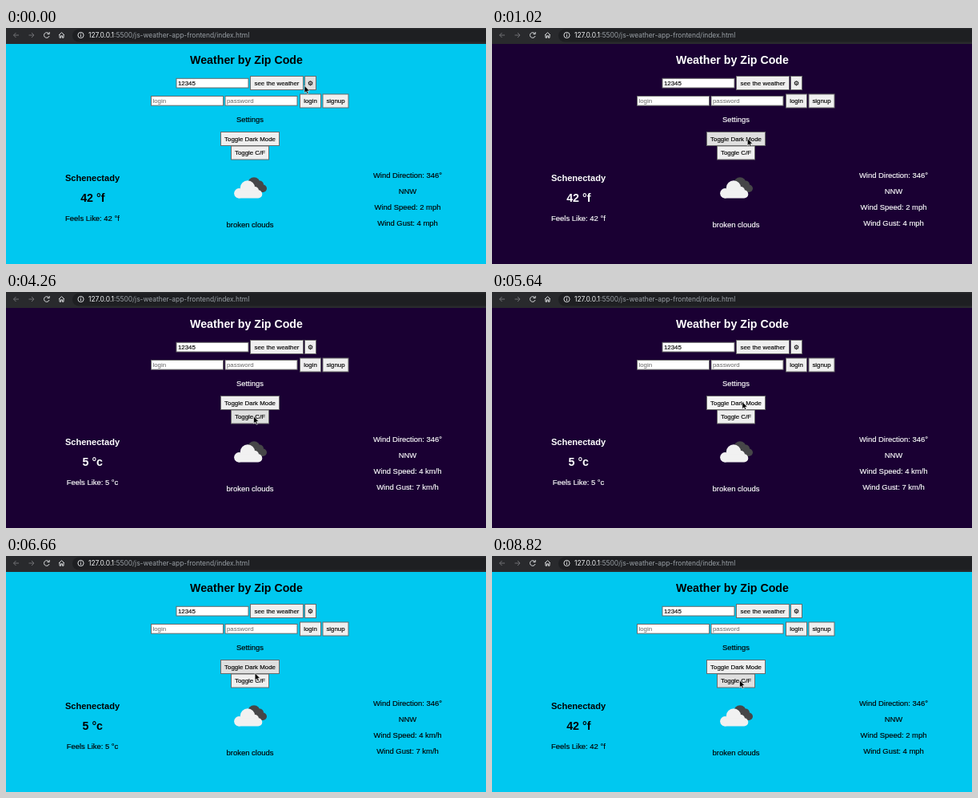
Animation, 600 px wide and 296 px high, one loop 8880 ms. Source, as an HTML page:

```html
<!DOCTYPE html>
<html lang="en">
<head>
<meta charset="utf-8">
<title>Weather by Zip Code</title>
<style>
  html, body { margin: 0; width: 100%; height: 100%; overflow: hidden; }
  svg { display: block; width: 600px; height: 296px; font: 9.45px "Liberation Sans", Arial, sans-serif; }
  #page { fill: #000; stroke: #000; stroke-width: .15; }
  #sky { fill: #00c8f0; }
  .dark #sky { fill: #1a0033; }
  .dark #page { fill: #fff; stroke: #fff; }
  .mid { text-anchor: middle; }
  .h2 { font-size: 14.2px; font-weight: bold; stroke: none; }
  .h3 { font-size: 11.05px; font-weight: bold; stroke: none; }
  .control { font-size: 7.87px; fill: #000; }
  .control text { stroke: #000; stroke-width: .15; }
  .control rect { fill: #efefef; stroke: #6b6b6b; }
  .control .field { fill: #fff; }
  .control .hover { fill: #dfdfdf; }
  .control .press { fill: #f5f5f5; }
  .control .hint { fill: #666; stroke: none; }
  .url { font: 8.43px Inter, sans-serif; fill: #9aa0a6; }
  .icons { fill: none; stroke: #dcdee0; }
  .icons .dim { stroke: #707175; }
</style>
</head>
<body>
<svg id="stage" viewBox="0 0 600 296">
  <rect id="sky" width="600" height="296"/>
  <rect width="600" height="20" fill="#292a2d"/>
  <rect x="83" y="1.5" width="540" height="16" rx="8" fill="#1e1f22"/>
  <g class="icons">
    <path class="dim" d="M16 9H9.5M12.5 6 9.5 9 12.5 12M28.5 9H35M32 6 35 9 32 12"/>
    <path d="M53.3 6.8a3.3 3.3 0 1 0 .7 3.2M54.2 5V7.6H51.6"/>
    <path d="M66 9 69.5 5.7 73 9M67 8.5v3.7h1.6v-2.4h1.8v2.4H72V8.5"/>
    <circle cx="93.5" cy="9" r="3.6"/>
    <path d="M93.5 8.5v2.6M93.5 6.6v1"/>
  </g>
  <text class="url" x="103" y="12"><tspan fill="#f1f3f4">127.0.0.1</tspan>:5500/js-weather-app-frontend/index.html</text>

  <g id="page" class="mid">
    <text class="h2" x="300.5" y="45">Weather by Zip Code</text>
    <text x="305" y="118">Settings</text>
    <text class="h3" x="108" y="192">Schenectady</text>
    <text class="h2" x="108.3" y="218.3" id="temp"></text>
    <text x="108" y="242" id="feels"></text>
    <text x="305" y="249.7">broken clouds</text>
    <text x="502" y="188">Wind Direction: 346°</text>
    <text x="502" y="208.3">NNW</text>
    <text x="502" y="228.3" id="speed"></text>
    <text x="502" y="248.3" id="gust"></text>
  </g>
  <g class="control" id="controls"></g>

  <g fill="#464648">
    <circle cx="310" cy="195" r="7.7"/>
    <circle cx="317" cy="196.5" r="5"/>
    <rect x="304" y="196.5" width="22" height="9.5" rx="4.7"/>
  </g>
  <g fill="#f1f1f1">
    <circle cx="302" cy="200.5" r="9.2"/>
    <circle cx="291.3" cy="207.3" r="6.2"/>
    <circle cx="311" cy="204" r="5"/>
    <rect x="286" y="203.3" width="34.3" height="10.2" rx="5.1"/>
  </g>
  <path id="cursor" d="M0 0V9.2L2.1 7.3 3.6 10.5 5.1 9.8 3.7 6.7H6.5Z" fill="#000" stroke="#fff" stroke-width=".6"/>
</svg>
<script>
const LOOP = 8880, STEP = 60;
const $ = id => document.getElementById(id);

// label, x, y, width, height
const buttons = [
  ['see the weather', 305.5, 60.5, 66, 17],
  ['⚙', 373.5, 60.5, 14, 17],
  ['login', 367.5, 83, 26, 17],
  ['signup', 396, 83, 32, 17],
  ['Toggle Dark Mode', 268.5, 130.5, 73, 17],
  ['Toggle C/F', 281.5, 148, 47, 17],
];
const fields = [['12345', 213, 63.3], ['login', 181.5, 85.5], ['password', 274, 85.5]];

// time, x, y of the pointer tip
const path = [
  [0, 373, 72.3], [60, 373, 72.3], [780, 319.3, 138.5], [3120, 319.3, 138.5],
  [3540, 309.5, 155.8], [4740, 309.5, 155.8], [5220, 312.8, 137.5], [6360, 312.8, 137.5],
  [6960, 309.5, 155.8], [LOOP, 309.5, 155.8],
];
const darkOn = 1020, darkOff = 5700, metricOn = 3960, metricOff = 8220;
const clicks = [darkOn, darkOff, metricOn, metricOff];

$('controls').innerHTML =
  fields.map(([label, x, y], i) =>
    `<rect class="field" x="${x}" y="${y}" width="90" height="11.7"/>
     <text class="${i ? 'hint' : ''}" x="${x + 2}" y="${y + 8.5}">${label}</text>`).join('') +
  buttons.map(([label, x, y, w, h]) =>
    `<rect class="button" x="${x}" y="${y}" width="${w}" height="${h}"/>
     <text class="mid" x="${x + w / 2}" y="${y + 11.2}">${label}</text>`).join('');
const faces = [...document.querySelectorAll('.button')];

function pointer(t) {
  const i = path.findIndex(p => p[0] > t);
  const [t0, x0, y0] = path[i - 1], [t1, x1, y1] = path[i];
  const u = (t - t0) / (t1 - t0), e = u * u * (3 - 2 * u);
  return [x0 + (x1 - x0) * e, y0 + (y1 - y0) * e];
}

function draw(now) {
  const t = Math.floor(now % LOOP / STEP) * STEP;
  const [px, py] = pointer(t);
  const metric = t >= metricOn && t < metricOff;
  const pressed = clicks.some(c => t >= c - 2 * STEP && t < c);
  $('stage').classList.toggle('dark', t >= darkOn && t < darkOff);
  $('cursor').setAttribute('transform', `translate(${px} ${py})`);
  faces.forEach((face, i) => {
    const [, x, y, w, h] = buttons[i];
    // allow for the button's border
    const over = px >= x - .5 && px <= x + w && py >= y && py <= y + h;
    face.setAttribute('class', 'button' + (over ? pressed ? ' press' : ' hover' : ''));
  });
  const degrees = metric ? '5 °c' : '42 °f';
  $('temp').textContent = degrees;
  $('feels').textContent = 'Feels Like: ' + degrees;
  $('speed').textContent = 'Wind Speed: ' + (metric ? '4 km/h' : '2 mph');
  $('gust').textContent = 'Wind Gust: ' + (metric ? '7 km/h' : '4 mph');
}

const start = performance.now();
function tick() {
  draw(performance.now() - start);
  requestAnimationFrame(tick);
}
tick();
</script>
</body>
</html>
```
